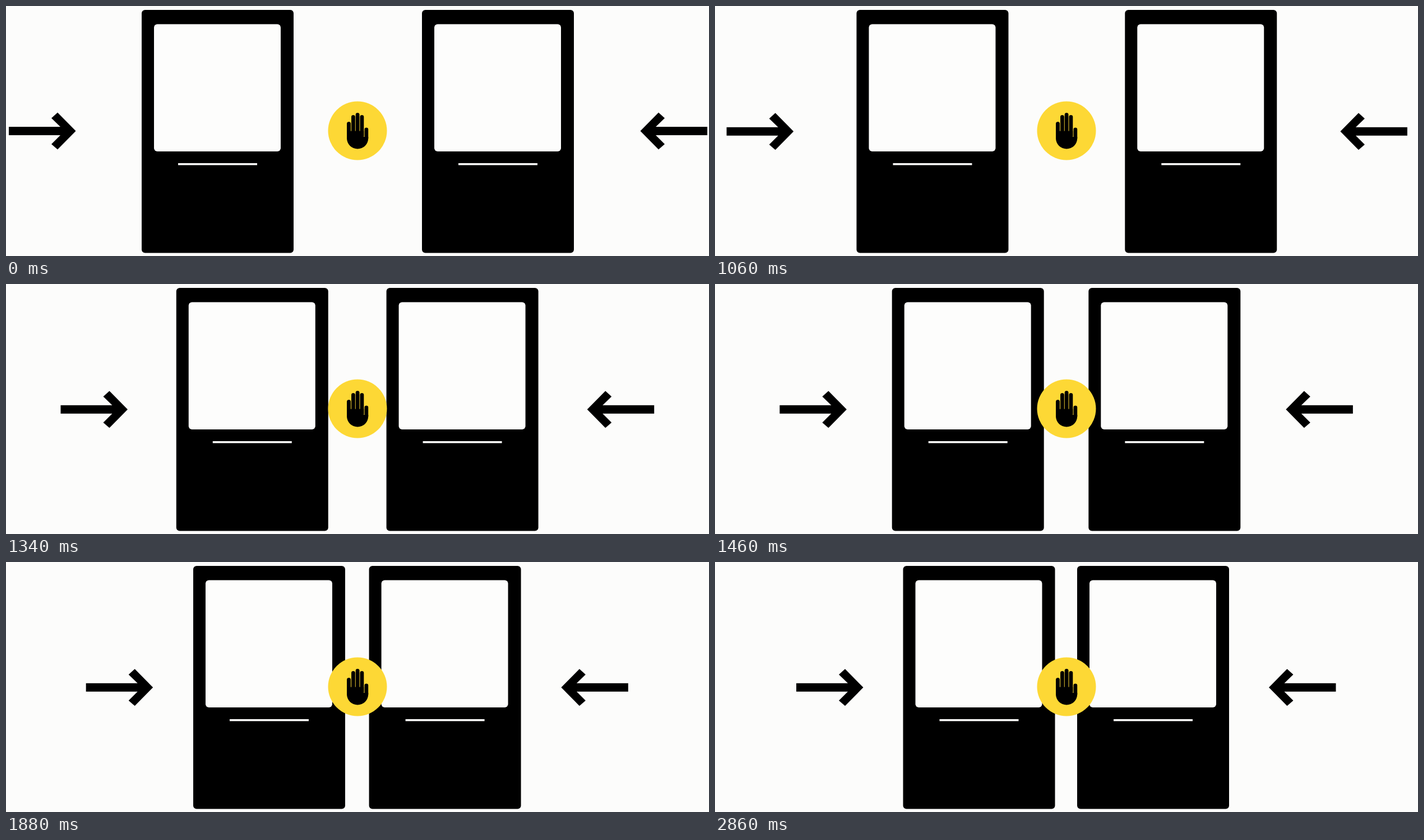
Write an HTML page that moves like this. It is 1254 px wide and 447 px high and loops after 2980 ms.

```html
<!DOCTYPE html>
<html lang="en">
<head>
<meta charset="utf-8">
<title>Closing doors</title>
<style>
  html, body { margin: 0; width: 100%; height: 100%; overflow: hidden; background: #fcfcfb; }
  svg { display: block; width: 1254px; height: 447px; }
  .pane { fill: #fdfdfc; }
</style>
</head>
<body>
<svg viewBox="0 0 1254 447">
  <defs>
    <g id="door">
      <rect x="242" y="7" width="271" height="434.5" rx="6"/>
      <rect class="pane" x="264" y="32.5" width="226" height="227.5" rx="6"/>
      <rect class="pane" x="307" y="281" width="141" height="3.5"/>
    </g>
    <path id="arrow" d="M5 216H97L81 200.5L92 190.5L124.5 223.5L92 256.5L81 247L97 231H5Z"/>
  </defs>

  <g id="leftDoor"><use href="#door"/></g>
  <g id="rightDoor"><use href="#door" x="500"/></g>
  <g id="leftArrow"><use href="#arrow"/></g>
  <g id="rightArrow"><use href="#arrow" transform="translate(1256 0) scale(-1 1)"/></g>

  <circle cx="627" cy="223" r="52.5" fill="#fdd835"/>
  <g id="hand">
    <rect x="608" y="207" width="7" height="32" rx="3.5"/>
    <rect x="616" y="195" width="6.8" height="40" rx="3.4"/>
    <rect x="623.7" y="191" width="6.8" height="44" rx="3.4"/>
    <rect x="631.5" y="195" width="6.8" height="40" rx="3.4"/>
    <rect x="639.5" y="217.5" width="6.7" height="22" rx="3.3"/>
    <path d="M608 225L616 223.5H638.3V234H646.2V236.4A19.1 19.1 0 0 1 608 236.4Z"/>
  </g>
</svg>
<script>
  const LOOP = 2980, STEP = 20;
  const START = 700, TURN = 1220, END = 2240, TURN_AT = 0.487;

  // Total horizontal travel, plus the small drop of the arrows.
  const parts = [
    ['leftDoor', 93.5, 0],
    ['rightDoor', -96, 0],
    ['leftArrow', 140, 0.8],
    ['rightArrow', -143.5, 0.8]
  ].map(([id, dx, dy]) => ({ el: document.getElementById(id), dx, dy }));

  // Sharp acceleration, then a long glide to rest.
  function progress(t) {
    if (t <= START) return 0;
    if (t >= END) return 1;
    if (t < TURN) return TURN_AT * ((t - START) / (TURN - START)) ** 4;
    return 1 - (1 - TURN_AT) * ((END - t) / (END - TURN)) ** 3.3;
  }

  function draw() {
    const t = Math.floor((performance.now() % LOOP) / STEP) * STEP;
    const p = progress(t);
    for (const { el, dx, dy } of parts) {
      const drop = p > 0.01 ? dy : 0;
      el.setAttribute('transform', `translate(${dx * p} ${drop})`);
    }
    requestAnimationFrame(draw);
  }
  draw();
</script>
</body>
</html>
```
